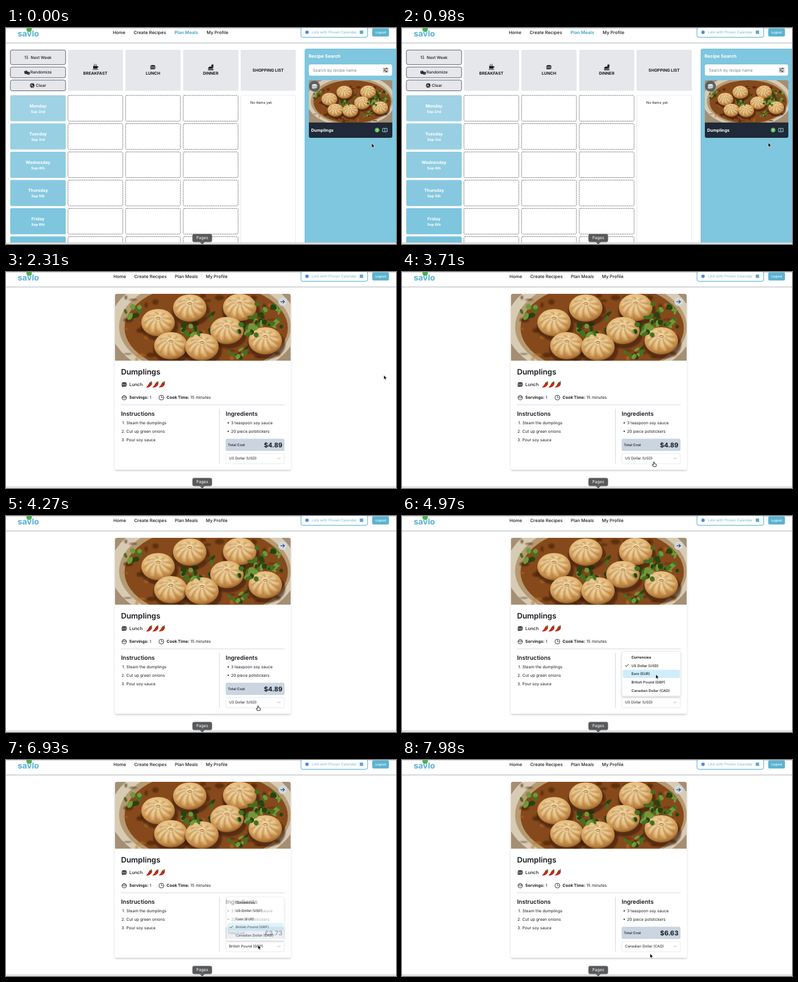
Animation of 640x356 px, one loop 8 s. Source, as an HTML page:

```html
<!DOCTYPE html>
<html lang="en">
<head>
<meta charset="utf-8">
<title>Meal planner</title>
<style>
html, body { margin: 0; height: 100%; overflow: hidden; background: #fff; }
svg { display: block; width: 100vw; height: 100vh; }
text { font-family: Inter, "Open Sans", sans-serif; text-rendering: geometricPrecision; white-space: pre; }
</style>
</head>
<body>
<svg id="stage" viewBox="0 0 640 356"></svg>
<script>
const LOOP = 8000, PAGE_CHANGE = 2200, FADE = 150;
const INK = '#181a1f', NAVY = '#1f2937', BLUE = '#7fc6df';
const stage = document.getElementById('stage');
const $ = id => document.getElementById(id);

// --- drawing helpers ---
const rect = (x, y, w, h, fill, r = 0, more = '') =>
  `<rect x="${x}" y="${y}" width="${w}" height="${h}" rx="${r}" fill="${fill}" ${more}/>`;
const text = (s, x, y, size, fill = INK, weight = 400, anchor = 'start', more = '') =>
  `<text x="${x}" y="${y}" font-size="${size}" fill="${fill}" font-weight="${weight}" text-anchor="${anchor}" ${more}>${s}</text>`;
const mid = (s, x, y, size, fill, weight) => text(s, x, y, size, fill, weight, 'middle');
const circle = (x, y, r, fill, more = '') => `<circle cx="${x}" cy="${y}" r="${r}" fill="${fill}" ${more}/>`;
const oval = (x, y, rx, ry, fill, more = '') =>
  `<ellipse cx="${x}" cy="${y}" rx="${rx}" ry="${ry}" fill="${fill}" ${more}/>`;
const line = (d, color = INK, width = 1, more = '') =>
  `<path d="${d}" fill="none" stroke="${color}" stroke-width="${width}" stroke-linecap="round" stroke-linejoin="round" ${more}/>`;
const shape = (d, fill) => `<path d="${d}" fill="${fill}"/>`;
const at = (x, y, content, scale = 1) => `<g transform="translate(${x} ${y}) scale(${scale})">${content}</g>`;
const stroked = (color, width = 1) => `stroke="${color}" stroke-width="${width}"`;

let seed = 11;
const random = () => (seed = seed * 16807 % 2147483647) / 2147483647;

// --- icons, centred on 0,0 ---
const burger = (color = INK) =>
  shape('M-4.3-1.1C-4.3-4.4 4.3-4.4 4.3-1.1Z', color) + rect(-4.6, -.3, 9.2, 1.2, color, .6) +
  shape('M-4.3 1.7H4.3Q4.3 3.6-2.5 3.6Q-4.3 3.6-4.3 1.7Z', color);
const coffee = shape('M-4-1.5H3V1.5Q3 3 1.5 3H-2.5Q-4 3-4 1.5Z', INK) + line('M3-.7Q5-.7 4.4.8Q4 1.6 3 1.5', INK, .9) +
  line('M-4.5 4.3H4M-2-2.5V-4.3M.8-2.5V-4.3', INK, .9);
const dinner = rect(-4.5, 2.8, 9, 1.7, INK, .6) + shape('M-4.5 2Q-4-1.5-.5-1.5T3 2Z', INK) +
  shape('M1-4.5H4.5L4 1.5H3L2.5-1H1Z', INK) + line('M2.8-4.5L3.8-5.5', INK, .6);
const chili = shape('M4.4-3C5.6 1.4 1 5.6-5.4 5C-2.6 3.2-1.4 0 .8-3.2Z', '#b3200f') +
  line('M-1.6 3.4Q2 2 2.4-1.5', '#e8543c', .7) + line('M1-3Q2.8-4 4.2-2.8M2.8-3.4L4-5', '#4b6b2a', 1.2);
const pot = circle(0, .2, 3.7, 'none', stroked(INK, .8)) + line('M-3.6-.4Q0 1.4 3.6-.4M-1.6-1.6L-.6-2.2M.8-1.8L1.6-1.4', INK, .8);
const clock = circle(0, 0, 4, 'none', stroked(INK, .8)) + line('M0-2.4V0H2', INK, .8);
const book = 'M0-2.7Q-1.8-3.5-3.7-2.8V2.7Q-1.8 2.3 0 3.1Q1.8 2.3 3.7 2.7V-2.8Q1.8-3.5 0-2.7V3';

// --- food picture ---
function dumpling([x, y]) {
  const folds = shift => [...Array(9)].map((_, i) => {
    const a = i * Math.PI * 2 / 9 + shift, c = Math.cos(a), s = Math.sin(a);
    return `M${c * 4} ${s * 3 - 8}Q${c * 13 - s * 5} ${s * 10 - 6 + c * 4} ${c * 22} ${s * 16}`;
  }).join('');
  return at(x, y, oval(2, 6, 31, 24, '#3a1a08', 'opacity=".6" filter="url(#soft)"') + oval(0, 0, 27.5, 22.5, 'url(#dough)') +
    `<g filter="url(#soft)">${line(folds(.3), '#a36a2c', 2.2, 'opacity=".6"')}${line(folds(.6), '#fbe6b8', 1.8, 'opacity=".55"')}</g>` +
    oval(0, -8, 6, 4.5, '#f3d6a0') + line('M-4-7Q0-11 4-7M-2-5.5Q1-7 3-5', '#a8702f', 1.1));
}
function herbs(cx, cy, spread, count) {
  let out = '';
  for (let i = 0; i < count; i++) {
    const x = cx + (random() - .5) * spread, y = cy + (random() - .5) * spread * .75;
    out += oval(x, y, 3 + random() * 4, 2 + random() * 2.5, ['#46701f', '#6f9a3a', '#27430f'][i % 3],
      `transform="rotate(${random() * 180} ${x} ${y})"`);
  }
  return out;
}
function food() {
  let spots = '';
  for (let i = 0; i < 90; i++)
    spots += oval(18 + random() * 250, 22 + random() * 122, 2 + random() * 6, 1 + random() * 4, i % 4 ? '#3f1c0a' : '#bf7428', 'opacity=".6"');
  const dumplings = [[123, 42], [205, 41], [71, 66], [184, 79], [92, 104], [143, 106], [247, 96]];
  return rect(0, 0, 289, 148, '#a48f74') + oval(146, 70, 154, 92, '#d8cbb4') + oval(148, 73, 141, 82, '#b59a72') +
    oval(150, 75, 134, 75, '#86491c') + `<g filter="url(#soft)">${spots}</g>` +
    herbs(153, 70, 48, 12) + herbs(35, 50, 36, 10) + dumplings.map(dumpling).join('') +
    herbs(247, 55, 54, 26) + herbs(218, 76, 30, 12) + herbs(125, 80, 34, 12) + herbs(203, 120, 34, 8);
}

// --- pages ---
const defs = `<defs>
  <radialGradient id="dough" cx=".45" cy=".33" r=".72"><stop stop-color="#f4dba6"/><stop offset=".5" stop-color="#e2b878"/><stop offset=".8" stop-color="#bd8341"/><stop offset="1" stop-color="#80501f"/></radialGradient>
  <linearGradient id="fall" x2="0" y2="1"><stop stop-color="#777" stop-opacity=".2"/><stop offset="1" stop-color="#777" stop-opacity="0"/></linearGradient>
  <filter id="shadow" x="-20%" y="-20%" width="140%" height="140%"><feDropShadow dx="0" dy="1.6" stdDeviation="1.6" flood-opacity=".2"/></filter>
  <filter id="soft"><feGaussianBlur stdDeviation=".9"/></filter>
  <clipPath id="cardTop"><path d="M178.5 146.5V40Q178.5 36 182.5 36H463.5Q467.5 36 467.5 40V146.5Z"/></clipPath>
  <clipPath id="tileTop"><path d="M497 156V89Q497 86 500 86H631Q634 86 634 89V156Z"/></clipPath>
  <symbol id="food" viewBox="0 0 289 147.5" preserveAspectRatio="xMidYMid slice">${food()}</symbol>
</defs>`;
const photo = (x, y, w, h, clip) => `<g clip-path="url(#${clip})"><use href="#food" x="${x}" y="${y}" width="${w}" height="${h}"/></g>`;

const nav = (centers, active) => ['Home', 'Create Recipes', 'Plan Meals', 'My Profile'].map((label, i) =>
  mid(label, centers[i], 9.6, 7.35, i === active ? '#4fa9c9' : INK, i === active ? 700 : 500)).join('');

const header = rect(0, 24.4, 640, 2.6, 'url(#fall)') + rect(0, 24, 640, .8, '#b3bcc1') + rect(0, 0, 640, .7, '#c4c4c4') +
  circle(38, 2, 4.5, '#4caf50') + mid('savlo', 36.8, 14.2, 13.4, '#55b2d0', 700) +
  rect(484, -1, 109.5, 16.3, '#fff', 3.5, stroked('#6fbfd9', 1.2)) + circle(494, 7, 2.8, '#4b87e8') +
  text('Link with Ploven Calendar', 502, 9.2, 6, '#72b9d2') + rect(580.5, 4.2, 5.6, 5.6, '#5aa9d8') +
  rect(601, .5, 27.5, 13.5, '#5db3d0', 2.5) + mid('Logout', 614.8, 8.8, 5.2, '#fff', 500);

const dock = rect(0, 353.8, 640, 2.2, '#ebebeb') + rect(0, 353.6, 640, .7, '#bdbdbd') +
  shape('M317 352L322 356.5L327 352Z', '#58595b') + rect(306, 339.5, 32, 13.3, '#58595b', 2.8, stroked('#8a8b8d', .6)) +
  mid('Pages', 322, 348.4, 6.7, '#fff');

function planner() {
  const columns = [101.5, 196, 290.7, 385], rowTop = i => 110.8 + i * 46.55;
  let out = nav([185.5, 236, 296, 347], 2);
  const button = (y, h, label, icon, iconX, x) => rect(7.2, y, 90.6, h, '#e5e7eb', 3, stroked('#62676f', 1)) +
    at(iconX, y + h / 2, icon) + text(label, x, y + h / 2 + 2.3, 6.6, INK, 500);
  const arrows = line('M-1.4 2.5V-2.5L-2.6-1.2M1.4-2.5V2.5L2.6 1.2', INK, .8);
  const dice = rect(-4.2, -3, 5, 5, INK, 1, 'transform="rotate(-12)"') + rect(-.2, -1, 4.6, 4.6, INK, 1) +
    circle(2, 1.3, .7, '#e5e7eb') + circle(-2, -.8, .7, '#e5e7eb');
  const clear = circle(0, 0, 3.6, INK) + circle(0, 0, 1, '#e5e7eb') + line('M0-2.4L-1.4-1.5M2 1.4L.6 2.4M-2 1.4L-2.2 0', '#e5e7eb', .9);
  out += button(36.3, 24, 'Next Week', arrows, 33.5, 40.5) + button(64.3, 17.7, 'Randomize', dice, 34.5, 40) +
    button(85.8, 17.7, 'Clear', clear, 43, 49);

  columns.forEach(x => out += rect(x, 36, 90.5, 67.5, '#e5e7eb', 1.5));
  ['BREAKFAST', 'LUNCH', 'DINNER', 'SHOPPING LIST'].forEach((label, i) =>
    out += mid(label, columns[i] + 45.2, i < 3 ? 77 : 72, 6.7, INK, 700));
  out += at(147, 64, coffee) + at(241, 64.5, burger()) + at(336, 65, dinner);

  ['Mon', 'Tues', 'Wednes', 'Thurs', 'Fri', 'Satur'].forEach((day, i) => {
    const y = rowTop(i), mix = k => Math.round([160, 210, 229][k] + ([118, 194, 220][k] - [160, 210, 229][k]) * i / 5);
    out += rect(7, y, 91, 43, `rgb(${mix(0)},${mix(1)},${mix(2)})`, 2) +
      mid(day + 'day', 52.5, y + 20, 7, '#fff', 700) + mid(`Sep ${i + 2}${['nd', 'rd'][i] || 'th'}`, 52.5, y + 28.7, 5.9, '#fff', 700);
    columns.slice(0, 3).forEach(x =>
      out += rect(x + .2, y + .3, 90, 42.4, '#fff', 2, stroked('#555', .8) + ' stroke-dasharray="2 1"'));
  });
  out += rect(385.3, 111, 90, 260, '#fff', 1.5, stroked('#e3e5e9', .8)) + text('No items yet.', 401, 125, 5.9);

  out += rect(490, 34, 152, 330, BLUE, 4) + text('Recipe Search', 496.5, 49.3, 7.5, '#fff', 700) +
    rect(497, 60, 136.5, 18.6, '#fff', 3) + text('Search by recipe name', 503.5, 71.8, 6.6, '#747b86') +
    line('M619 66.5H627M619 69.3H627M619 72H627', INK, .8) +
    circle(624.5, 66.5, 1.1, INK) + circle(621.5, 69.3, 1.1, INK) + circle(624, 72, 1.1, INK);
  out += photo(497, 86, 137, 70, 'tileTop') + shape('M497 155.7H634V178Q634 181 631 181H500Q497 181 497 178Z', NAVY) +
    circle(506.2, 96, 9, '#555b60', 'opacity=".92"') + at(506.2, 96, burger('#fff')) +
    text('Dumplings', 500.8, 171, 7, '#fff', 700) + circle(609, 168.3, 3.8, '#5cb85c') + mid('?', 609, 170.6, 6, '#fff', 700) +
    at(621.7, 168.3, `<path id="book" d="${book}" fill="none" stroke-width=".9"/>`);
  return out;
}

function recipe() {
  const heading = (s, x) => text(s, x, 236.6, 9.6, INK, 600);
  let out = nav([186.7, 237, 296, 345.7], -1);
  out += rect(178.5, 36, 289, 290, '#fff', 4, 'filter="url(#shadow)"') + photo(178.5, 36, 289, 110.3, 'cardTop') +
    circle(454, 49, 7, '#cfd9e2') + line('M451 49H457M454.5 46.5L457 49L454.5 51.5', INK, 1);
  out += text('Dumplings', 188.7, 168.7, 12.5, INK, 600) + at(194, 185.3, burger()) + text('Lunch', 202.3, 187.8, 7.4, INK, 500) +
    [235, 245.5, 256].map(x => at(x, 185.3, chili)).join('') + at(194, 207, pot) + at(255, 207, clock) +
    text('<tspan font-weight="700">Servings:</tspan> 1', 202.3, 209.3, 6.7) +
    text('<tspan font-weight="700">Cook Time:</tspan> 15 minutes', 263.5, 209.3, 6.7);
  out += line('M189 219H457', '#d1d5db', .9) + line('M350.3 226V315.5', '#d1d5db', .9) +
    heading('Instructions', 188.7) + heading('Ingredients', 360.5);
  ['Steam the dumplings', 'Cut up green onions', 'Pour soy sauce'].forEach((step, i) =>
    out += text(`${i + 1}.`, 195.3, 251 + i * 13.9, 6.6, INK, 400, 'end') + text(step, 197.5, 251 + i * 13.9, 6.6));
  ['3 teaspoon soy sauce', '20 piece potstickers'].forEach((item, i) =>
    out += circle(364.7, 248.7 + i * 13.9, 1.1, INK) + text(item, 369.2, 251 + i * 13.9, 6.6));
  out += rect(360.5, 274.7, 96.5, 20.3, '#cbd5e1', 2.5) + text('Total Cost', 364, 287, 5.8, INK, 500) +
    text('', 453.7, 288.8, 10.5, INK, 700, 'end', 'id="cost"') +
    rect(360.8, 299, 96, 17, '#fff', 2.5, stroked('#e2e5ea', .8)) + text('', 366, 309.4, 6, INK, 400, 'start', 'id="chosen"') +
    line('M446 306.2L448 308.2L450 306.2', '#9ca3af', .8);
  return out;
}

const currencies = [['US Dollar (USD)', '$4.89'], ['Euro (EUR)', '€4.43'], ['British Pound (GBP)', '£3.73'], ['Canadian Dollar (CAD)', '$6.63']];
const itemY = i => 246.4 + i * 13.8;
const menu = rect(360.7, 223.2, 96.6, 73.5, '#fff', 3, stroked('#e2e5ea', .8) + ' filter="url(#shadow)"') +
  rect(362.5, 0, 93.5, 13.4, '#cfedfa', 2, 'id="highlight"') + text('Currencies', 376.4, 235, 6, INK, 700) +
  currencies.map(([name], i) => text(name, 376.4, itemY(i) + 2.1, 5.9, INK, 500)).join('') +
  `<g id="check">${line('M366.7 0L368.3 1.8L371.6-2', INK, .9)}</g>`;

const arrowCursor = `<path d="M0 0V7.2L1.7 5.7L2.8 8.2L4 7.7L2.9 5.3H5.1Z" fill="#000" stroke="#fff" stroke-width=".6"/>`;
const handCursor = `<path d="M-.8.4Q0-.5.8.4V3L3.6 3.7Q4.2 4 4 5L3.3 7.7H-1.2L-3 4.7Q-2.6 3.6-.8 5Z" fill="#fff" stroke="#000" stroke-width=".8"/>`;

stage.innerHTML = defs + rect(0, 0, 640, 356, '#fff') + `<g id="planner">${planner()}</g><g id="recipe">${recipe()}</g>` + header +
  `<g id="menu">${menu}</g>` + dock + `<g id="cursor"><g id="arrow">${arrowCursor}</g><g id="hand">${handCursor}</g></g>`;

// --- motion ---
// Pointer stops: time, x, y of the tip
const pointer = [
  [0, 600, 190], [900, 600, 190], [1500, 620, 170], [2500, 620, 170], [3360, 440, 272], [3650, 413.5, 313],
  [4250, 413.5, 313], [4480, 414, 309], [4560, 414, 309], [4920, 416.5, 261], [5200, 416.5, 261], [5600, 420, 308],
  [5860, 421, 307], [5950, 421, 292], [6180, 415, 275], [6320, 415, 275], [6680, 413.5, 306], [6930, 413.5, 305],
  [7250, 413, 288], [7420, 413, 288], [7750, 407, 319], [8000, 407, 319]
];
// Menu visits: opens, closes, currency chosen on closing
const visits = [[4480, 5160, 1], [5835, 6290, 2], [6872, 7400, 3]];

const clamp = v => Math.max(0, Math.min(1, v));
const easeOut = p => 1 - (1 - p) ** 2;
const show = (id, on) => $(id).setAttribute('visibility', on ? 'visible' : 'hidden');

function pointerAt(t) {
  const i = pointer.findIndex(stop => stop[0] > t), [t0, x0, y0] = pointer[i - 1], [t1, x1, y1] = pointer[i];
  const p = (t - t0) / (t1 - t0), e = p * p * (3 - 2 * p);
  return [x0 + (x1 - x0) * e, y0 + (y1 - y0) * e];
}

function draw(t) {
  const onRecipe = t >= PAGE_CHANGE, [x, y] = pointerAt(t);
  show('planner', !onRecipe);
  show('recipe', onRecipe);

  const chosen = visits.reduce((current, [, close, choice]) => t >= close ? choice : current, 0);
  const visit = visits.find(([open, close]) => t >= open && t < close + FADE);
  const isOpen = visit && t < visit[1];
  $('chosen').textContent = currencies[chosen][0];
  $('cost').textContent = currencies[chosen][1];

  show('menu', visit);
  if (visit) {
    const [open, close] = visit;
    const shown = isOpen ? easeOut(clamp((t - open) / FADE)) : 1 - easeOut(clamp((t - close) / FADE));
    const scale = .95 + .05 * shown, slide = isOpen ? 2 * (1 - shown) : 0;
    $('menu').setAttribute('opacity', shown);
    $('menu').setAttribute('transform', `translate(${409 * (1 - scale)} ${297 * (1 - scale) + slide}) scale(${scale})`);
    const hovered = Math.floor((y - 239.6) / 13.8);
    const lit = isOpen && t - open > FADE && hovered >= 0 && hovered < 4 ? hovered : chosen;
    $('highlight').setAttribute('y', itemY(lit) - 6.7);
    $('check').setAttribute('transform', `translate(0 ${itemY(chosen)})`);
  }

  const onBook = !onRecipe && x > 617;
  const onSelect = onRecipe && !isOpen && x > 360 && x < 457 && y > 299 && y < 316;
  $('book').setAttribute('stroke', onBook ? '#41748f' : '#a9d9ea');
  show('hand', onBook || onSelect);
  show('arrow', !(onBook || onSelect));
  $('cursor').setAttribute('transform', `translate(${x} ${y})`);
}

(function tick() {
  draw(performance.now() % LOOP);
  requestAnimationFrame(tick);
})();
</script>
</body>
</html>
```
